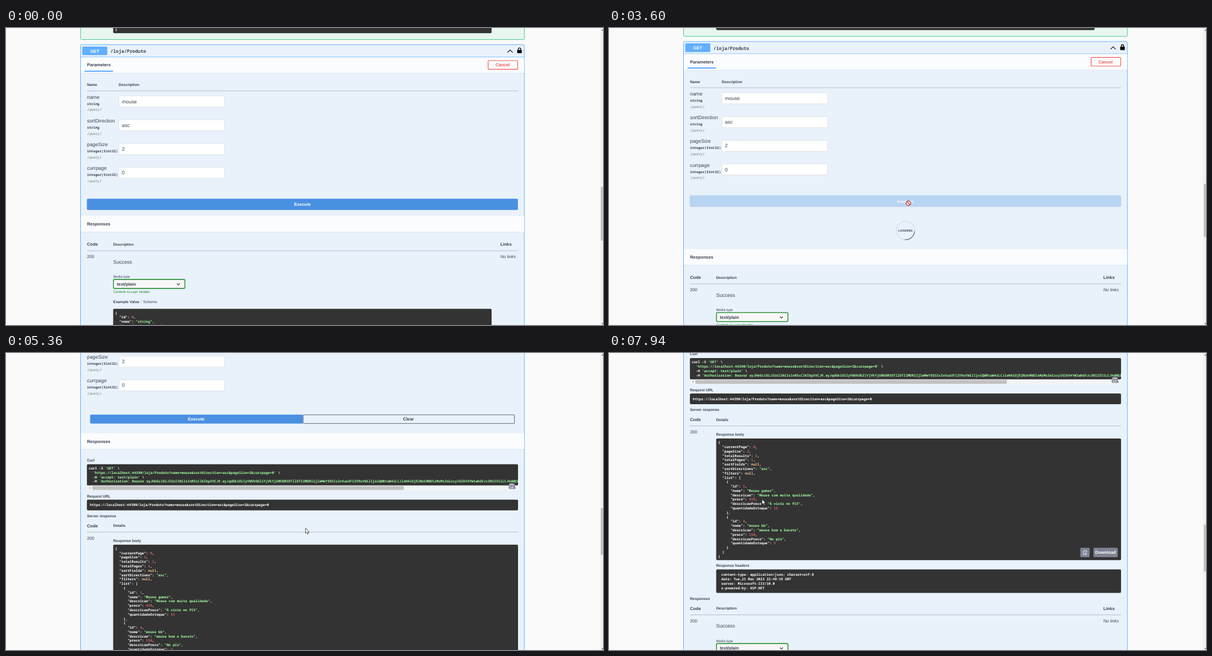
These frames come from a looping animation (1061 px wide and 528 px high, 8 s). An HTML page:

```html
<!DOCTYPE html>
<html lang="pt">
<head>
<meta charset="utf-8">
<title>API explorer</title>
<style>
  html, body { margin: 0; width: 100%; height: 100%; overflow: hidden; background: #fafafa; }
  svg { display: block; width: 100vw; height: 100vh; }
  text { font-family: "Liberation Sans", Arial, sans-serif; fill: #3b4151; white-space: pre; text-rendering: geometricPrecision; }
  .b { font-weight: 700; }
  .i { font-style: italic; }
  .mid { text-anchor: middle; }
  .mono { font-family: "Noto Sans Mono", "DejaVu Sans Mono", monospace; }
  .white { fill: #fff; }
  .str { fill: #a2fca2; }
  .num { fill: #d36363; }
  .nul { fill: #fcc28c; }
  .green { fill: #1a7f2b; }
  .red { fill: #f25a50; }
  .grey { fill: #6d7a78; }
  .lift { filter: drop-shadow(0 0 1.6px rgba(0, 0, 0, .3)); }
</style>
</head>
<body>
<svg id="stage" viewBox="0 0 1061 528" xmlns="http://www.w3.org/2000/svg"></svg>
<script>
const LOOP = 8000, TICK = 70.4;
const CODE = 6.1, LINE = 7.79;          // code font size and line height
const SMALL = 6.63, TEXT = 7.74, LARGE = 8.84;
const DARK = '#333', BLUE = '#61affe', ACTION = '#4990e2', SLATE = '#7d8293';

const esc = s => s.replace(/&/g, '&amp;').replace(/</g, '&lt;');
const rect = (x, y, x2, y2, fill, more = '') =>
  `<rect x="${x}" y="${y}" width="${x2 - x}" height="${y2 - y}" fill="${fill}" ${more}/>`;
const path = (d, stroke, width = 1, fill = 'none') =>
  `<path d="${d}" stroke="${stroke}" stroke-width="${width}" fill="${fill}"/>`;
const rule = y => path(`M144 ${y}H910`, 'rgba(59,65,81,.38)', .8);
const group = (id, inner, more = '') => `<g id="${id}" ${more}>${inner}</g>`;
const span = (cls, s) => `<tspan class="${cls}">${esc(s)}</tspan>`;

// Text placed by its vertical middle
const raw = (x, y, size, cls, inner) =>
  `<text x="${x}" y="${(y + size * .36).toFixed(2)}" font-size="${size}" class="${cls}">${inner}</text>`;
const label = (x, y, s, size = TEXT, cls = 'b') => raw(x, y, size, cls, esc(s));
const code = (x, y, inner) => raw(x, y, CODE, 'mono b white', inner);

function paint(line) {
  return line.replace(/("[^"]*")(:?)|\b(\d+)\b|null/g, (m, str, colon, num) =>
    str ? (colon ? m : span('str', m)) : span(num ? 'num' : 'nul', m));
}
const lines = (x, y, list, f = esc) =>
  list.map((s, i) => code(x, y + i * LINE, f(s))).join('');

const band = (y, h) =>
  rect(133, y + h, 921, y + h + 1, 'rgba(0,0,0,.07)') + rect(133, y, 921, y + h, 'rgba(255,255,255,.82)');

const clipboard = (x, y) =>
  path(`M${x - 3} ${y - 3}h6v2.4M${x - 3} ${y - 3}v7h3.2M${x - 1.4} ${y - 3.6}h2.8M${x + 3.6} ${y + 1.5}h-4m1.6 -1.6l-1.6 1.6 1.6 1.6M${x + 3} ${y + 3}v1h-2`, '#fff', .8);

function field(name, type, value, i) {
  const y = 122.5 + 42.2 * i;
  return label(144, y, name, LARGE, '') +
    label(144, y + 12, type, CODE, 'mono b') +
    label(144, y + 22.6, '(query)', CODE, 'mono i grey') +
    rect(200.5, y - 1.7, 388.7, y + 18, '#fff', 'rx="2" stroke="#d5d9de" stroke-width=".7"') +
    label(206, y + 7.9, value, LARGE, '');
}

function head() {
  return rect(132.5, -40, 921.2, 20.5, '#e8f6ef', 'rx="2" stroke="#49cc90"') +
    rect(190.5, -30, 863, 9.3, DARK, 'rx="2"') + code(194, 2.5, '}') +
    rect(132.5, 29.7, 921.2, 2000, '#e9f2fb', 'rx="2" stroke="#61affe"') +
    path('M133 51.5H921', BLUE, .7) +
    rect(135.5, 33, 180, 48.3, BLUE, 'rx="1.7"') + label(157.8, 41, 'GET', TEXT, 'b white mid') +
    label(185.5, 41.5, '/loja/Produto', 8.13, 'mono b') +
    path('M891.3 43.5L895.9 39l4.6 4.5', '#111', 1.2) +
    rect(908.5, 39, 916.7, 44.8, '#000', 'rx=".8"') +
    path('M910.4 40v-2.2a2.2 2.4 0 0 1 4.4 0V40', '#000', 1.3) +
    band(52, 28) + label(144, 65.6, 'Parameters') + rect(139.6, 75.7, 190.2, 77.9, BLUE) +
    rect(856.8, 58, 909.4, 73.4, 'none', 'rx="2" stroke="#f25a50" stroke-width="1.2"') +
    label(882.6, 65.7, 'Cancel', TEXT, 'b red mid') +
    label(144, 101, 'Name', SMALL) + label(200.3, 101, 'Description', SMALL) + rule(111.8) +
    [['name', 'string', 'mouse'], ['sortDirection', 'string', 'asc'],
     ['pageSize', 'integer($int32)', '2'], ['currpage', 'integer($int32)', '0']]
      .map((f, i) => field(...f, i)).join('');
}

const executeWide = () =>
  rect(143.8, 303.5, 909.8, 323.5, ACTION, 'id="wideBox" rx="2"') +
  label(526.8, 313.6, 'Execute', TEXT, 'b white mid');

const loader = () =>
  '<circle cx="527" cy="365.7" r="16.3" fill="none" stroke="rgba(85,85,85,.16)" stroke-width="1.1"/>' +
  group('arc', path('M515.5 354.2A16.3 16.3 0 0 1 538.5 354.2', 'rgba(0,0,0,.55)', 1.2)) +
  label(526.8, 366, 'LOADING', 5.53, 'b mid');

const responsesBand = () => band(334.3, 28) + label(144, 348.6, 'Responses');

function table() {
  const accept = raw(190.5, 469.2, 6.08, 'green',
    'Controls <tspan class="mono" font-size="5.6">Accept</tspan> header.');
  return label(144, 384.6, 'Code') + label(190.5, 384.4, 'Description', SMALL) +
    label(878.5, 384.6, 'Links') + rule(396) +
    label(144, 406.5, '200', TEXT, '') + label(878.5, 406.5, 'No links', TEXT, 'i') +
    label(190.5, 415.5, 'Success', LARGE, '') + label(190.5, 442, 'Media type', 6.08, '') +
    rect(191, 447, 318, 463, '#f7f7f7', 'rx="2" stroke="#0b8016" stroke-width="1.3"') +
    label(197, 455, 'text/plain') + path('M303.8 454.2l2.6 2.6 2.6 -2.6', '#222', 1.1) +
    accept + label(190.5, 486.2, 'Example Value', SMALL) +
    path('M240.3 482.5v7.5', 'rgba(59,65,81,.3)', .6) + label(243.8, 486.2, 'Schema', SMALL, '') +
    rect(190.5, 499.3, 863, 620, DARK, 'rx="2"') +
    lines(194, 506.3, ['{', '  "id": 0,', '  "nome": "string",', '  "descricao": "string",'], paint);
}

const item = (id, nome, descricao, preco, forma, estoque, end) => [
  '    {', `      "id": ${id},`, `      "nome": "${nome}",`, `      "descricao": "${descricao}",`,
  `      "preco": ${preco},`, `      "descricaoPreco": "${forma}",`,
  `      "quantidadeEstoque": ${estoque}`, '    }' + end];

const BODY = ['{', '  "currentPage": 0,', '  "pageSize": 2,', '  "totalResults": 2,',
  '  "totalPages": 1,', '  "sortFields": null,', '  "sortDirections": "asc",', '  "filters": null,',
  '  "list": [',
  ...item(1, 'Mouse gamer', 'Mouse com muita qualidade', 439, 'À vista no PIX', 15, ','),
  ...item(4, 'mouse bb', 'mouse bom e barato', 150, 'No pix', 5, ''),
  '  ]', '}'].map(s => s.replace(/^    (?= *)/, '    '));

const HEADERS = ['content-type: application/json; charset=utf-8', 'date: Tue,21 Mar 2023 22:49:19 GMT',
  'server: Microsoft-IIS/10.0', 'x-powered-by: ASP.NET'];

const URL_TEXT = 'https://localhost:44390/loja/Produto?name=mouse&sortDirection=asc&pageSize=2&currpage=0';
const TOKEN = 'eyJhbGciOiJIUzI1NiIsInR5cCI6IkpXVCJ9.eyJqdGkiOiIyYWVkOGZiYjVkYjU0OGM3OTllOTI2MDRlZjlmMmY5OSIsInVuaXF1ZV9uYW1lIjoiQWRtaW4iLCJleHAiOjE2Nzk0NDIxMzMsImlzcyI6IkV4YW1wbGVJc3N1ZXIiLCJhdWQiOi';
const CURL = ["curl -X 'GET' \\", `  '${URL_TEXT}' \\`, "  -H 'accept: text/plain' \\",
  `  -H 'Authorization: Bearer ${TOKEN}`];
const paintShell = s => s.split(/('[^']*'?)/).map(p => p[0] === "'" ? span('str', p) : esc(p)).join('');

function result() {
  return group('half', rect(149.5, 253.8, 527.8, 269.8, ACTION, 'rx="2"') +
      label(338, 262, 'Execute', TEXT, 'b white mid')) +
    rect(528, 254.2, 903.6, 269.6, 'none', 'rx="1.5" stroke="#7b828d" stroke-width="1.3"') +
    label(715.3, 262, 'Clear', TEXT, 'b mid') +
    label(144, 335, 'Curl', SMALL) + rect(143.8, 342, 910, 380, DARK, 'rx="2"') +
    `<g clip-path="url(#curlClip)">${lines(147, 349.2, CURL, paintShell)}</g>` +
    rect(143.8, 379.8, 910, 389, '#f1f3f5') + rect(153.5, 381, 707, 387.8, '#c1c1c1') +
    path('M149.8 382.8l-1.8 1.6 1.8 1.6z', 'none', 0, '#888') +
    path('M904 382.8l1.8 1.6 -1.8 1.6z', 'none', 0, '#444') +
    rect(893.5, 375.8, 904.5, 386.3, SLATE, 'rx="2"') + clipboard(899, 381) +
    label(144, 398.5, 'Request URL', SMALL) + rect(143.8, 405, 910, 424, DARK, 'rx="2"') +
    code(149, 414.6, esc(URL_TEXT)) +
    label(144, 433.5, 'Server response', SMALL) +
    label(144, 451.6, 'Code') + label(190.5, 451.2, 'Details', SMALL) + rule(462.7) +
    label(144, 473.3, '200', TEXT, '') + label(190.5, 478, 'Response body', SMALL) +
    rect(190.5, 485, 910, 701.3, DARK, 'rx="2"') + lines(194, 492, BODY, paint) +
    rect(837.5, 679.3, 854.2, 696, SLATE, 'rx="2"') + clipboard(846, 687.8) +
    rect(861, 679.3, 904.2, 696, SLATE, 'rx="2"') + label(882.5, 687.6, 'Download', TEXT, 'b white mid') +
    label(190.5, 711, 'Response headers', SMALL) + rect(190.5, 717.8, 910, 759.6, DARK, 'rx="2"') +
    lines(199.5, 727, HEADERS) + label(144, 769.2, 'Responses', SMALL);
}

const cursors = () =>
  group('arrow', path('M0 0V9L2.1 7.1 3.6 10.4 5 9.8 3.6 6.6H6.4Z', '#111', .7, '#fff')) +
  group('hand', path('M-.8 6V.7a.8 .8 0 0 1 1.7 0V4l4 .8q1 .3 .8 1.4l-.7 3.8h-4.6l-3 -3.6q.6 -1.2 1.8 -.4Z', '#111', .7, '#fff')) +
  group('deny', '<circle r="4" fill="#fff" stroke="#c03a2b" stroke-width="1.4"/>' +
    path('M-2.8 -2.8L2.8 2.8', '#c03a2b', 1.4));

const stage = document.getElementById('stage');
stage.innerHTML =
  '<defs><clipPath id="curlClip"><rect x="144" y="340" width="766" height="42"/></clipPath></defs>' +
  rect(0, 0, 1061, 528, '#fafafa') +
  group('page', head() + group('wide', executeWide()) + group('loader', loader()) +
    group('band', responsesBand()) + group('result', result(), 'transform="translate(0 55.5)"') +
    group('table', table())) +
  rect(1055.5, 0, 1061, 528, '#f1f1f1') + rect(1057, 0, 1061, 1, '#c1c1c1', 'id="thumb"') +
  path('M1058.2 4.5l1.8 -2 1.8 2z', 'none', 0, '#555') +
  path('M1058.2 524.8l1.8 2 1.8 -2z', 'none', 0, '#555') +
  group('cursor', cursors());

const el = {};
stage.querySelectorAll('[id]').forEach(n => el[n.id] = n);

const clamp = x => Math.max(0, Math.min(1, x));
const ease = x => (x = clamp(x), x * x * (3 - 2 * x));
const show = (node, on) => node.setAttribute('display', on ? 'inline' : 'none');
const move = (node, x, y) => node.setAttribute('transform', `translate(${x.toFixed(2)} ${y.toFixed(2)})`);

const NOTCH = 55.5;
// start, end, wheel notches
const WHEEL = [[3545, 3775, 1], [4760, 4998, 1], [5190, 5415, 2], [5410, 5632, 1], [5970, 6095, 1], [7100, 7330, 1]];
// time, x, y
const POINTER = [[70, 1002, 511], [600, 562, 288], [870, 531, 308], [985, 532, 308], [1050, 532, 311.5],
  [6370, 532.5, 311.5], [6830, 279.5, 298], [7090, 279.5, 298], [7500, 289, 276], [7880, 283, 259], [7950, 272, 260]];
const SENT = 1056, DONE = 4010;

function pointerAt(t) {
  let i = 0;
  while (i < POINTER.length - 2 && t > POINTER[i + 1][0]) i++;
  const [a, ax, ay] = POINTER[i], [b, bx, by] = POINTER[i + 1], e = ease((t - a) / (b - a));
  return [ax + (bx - ax) * e, ay + (by - ay) * e];
}

function render(t) {
  const busy = t >= SENT && t < DONE, done = t >= DONE;
  const scroll = WHEEL.reduce((y, [a, b, n]) => y + n * NOTCH * ease((t - a) / (b - a)), 0);
  move(el.page, 0, -scroll);

  show(el.wide, !done);
  show(el.loader, busy);
  show(el.result, done);
  move(el.band, 0, done ? 8.2 : busy ? 64.5 : 0);
  move(el.table, 0, done ? 458 : busy ? 64.5 : 0);

  const fade = 1 - Math.pow(1 - clamp((t - SENT) / 300), 1.5);
  el.wide.setAttribute('opacity', 1 - .7 * fade);
  el.wideBox.setAttribute('class', t > 780 ? 'lift' : '');
  el.half.setAttribute('opacity', .3 + .7 * ease((t - DONE) / 280));
  el.arc.setAttribute('transform', `rotate(${45 + (t - 1197) / 1057 * 360} 527 365.7)`);

  const [top, size] = done ? [244.3 + scroll * .157, 83] : busy ? [276.3 + scroll * .17, 94] : [282.5, 95.5];
  el.thumb.setAttribute('y', top);
  el.thumb.setAttribute('height', size);

  const [x, y] = pointerAt(t);
  const over = !busy && !done && y > 300 && y < 324 && x < 910;
  show(el.cursor, t >= 70);
  move(el.cursor, x, y);
  show(el.deny, busy);
  show(el.hand, over);
  show(el.arrow, !busy && !over);
}

const start = performance.now();
function loop() {
  const ms = (performance.now() - start) % LOOP;
  render(Math.floor((ms + 16) / TICK) * TICK);
  requestAnimationFrame(loop);
}
loop();
</script>
</body>
</html>
```
